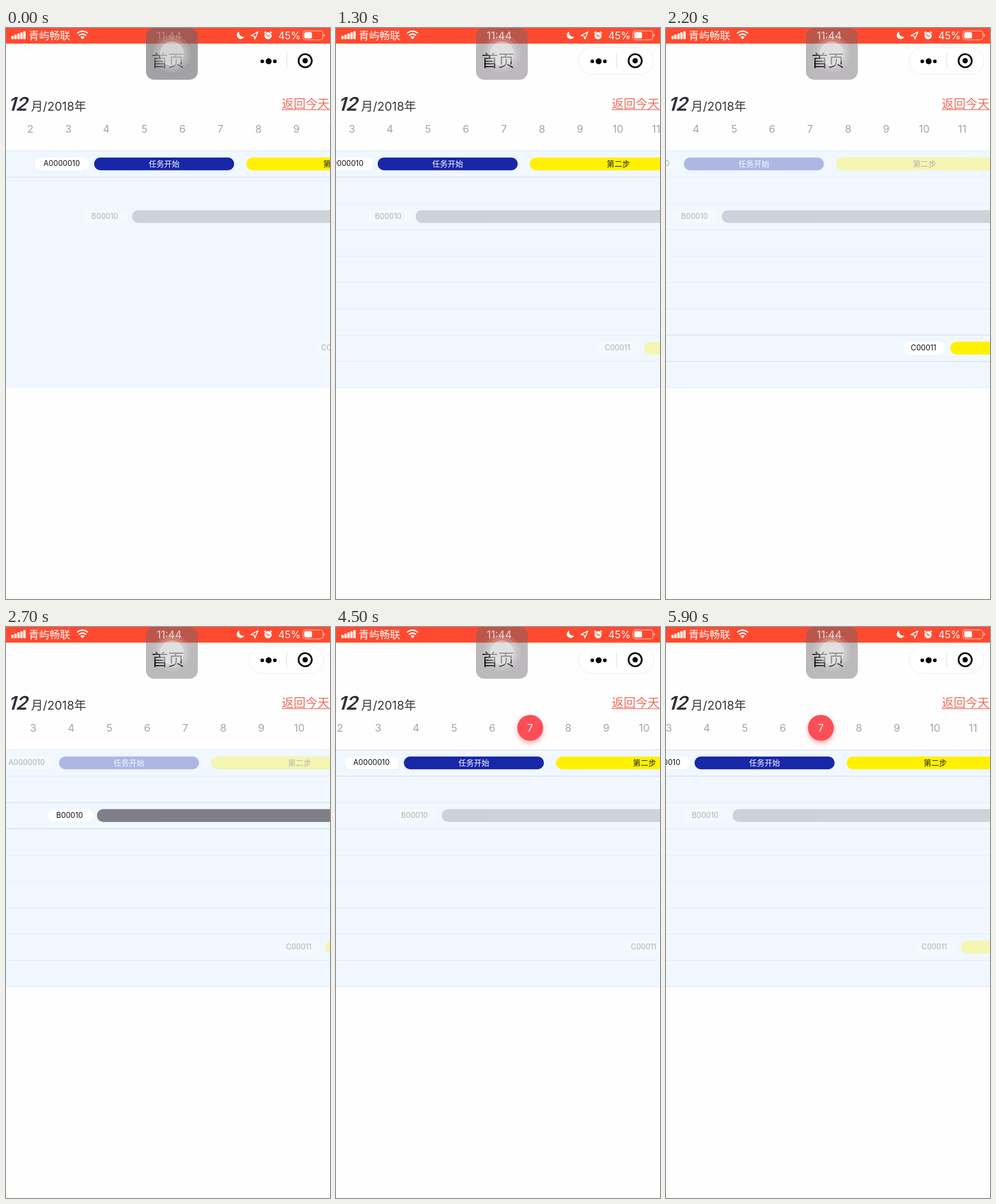
An HTML page that plays this animation: 544 by 960 pixels, repeating every 6000 ms.

```html
<!DOCTYPE html>
<html lang="zh-CN">
<head>
<meta charset="utf-8">
<style>
html, body { margin: 0; height: 100%; overflow: hidden; background: #fefefe; }
svg { display: block; width: 100vw; height: 100vh; font-family: Inter, "Noto Sans CJK SC", "Noto Sans CJK", sans-serif; }
.mid { text-anchor: middle; }
#rows .mid { font-size: 13px; }
</style>
</head>
<body>
<svg viewBox="0 0 544 960">
  <defs>
    <filter id="glow" x="-50%" y="-50%" width="200%" height="200%">
      <feDropShadow dx="0" dy="4" stdDeviation="4" flood-color="#fb5058" flood-opacity=".45"/>
    </filter>
  </defs>

  <!-- status bar -->
  <rect width="544" height="26.3" fill="#ff4a2f"/>
  <g fill="#fff">
    <g id="signal"></g>
    <text x="38" y="18.5" font-size="17.5">青屿畅联</text>
    <path d="M119.5 9A13 13 0 0 1 137.5 9M122.6 12.6A8.5 8.5 0 0 1 134.4 12.6" fill="none" stroke="#fff" stroke-width="2.4"/>
    <path d="M125 15.2a5 5 0 0 1 7 0l-3.5 3.8z"/>
    <path d="M391.5 6A6.5 6.5 0 1 0 400 14.5A7 7 0 0 1 391.5 6z"/>
    <path d="M411 12.8L423 6.5L417.8 18.5L416.6 13.4z" fill="none" stroke="#fff" stroke-width="1.5" stroke-linejoin="round"/>
    <circle cx="440" cy="13" r="6"/>
    <path d="M433.6 8.6l3-2.8M446.4 8.6l-3-2.8" stroke="#fff" stroke-width="1.8"/>
    <path d="M437 10.5l3 3h3" fill="none" stroke="#ff4a2f" stroke-width="1.3"/>
    <text x="457" y="18.5" font-size="17">45%</text>
    <rect x="498.6" y="4.8" width="33.4" height="15" rx="4" fill="none" stroke="#fff" stroke-opacity=".6" stroke-width="1.2"/>
    <rect x="500.8" y="7" width="13" height="10.6" rx="2"/>
    <path d="M533.5 9.5q2 .5 2 2.8t-2 2.8z" opacity=".6"/>
  </g>

  <!-- title bar -->
  <rect class="settle" x="408" y="32.5" width="125.5" height="45.5" rx="22.7" fill="#fff" stroke="#eee"/>
  <g fill="#050505">
    <circle cx="430.3" cy="56" r="3.1"/><circle cx="441" cy="56" r="5"/><circle cx="451.4" cy="56" r="3.1"/>
    <circle cx="502.3" cy="55" r="4.5"/>
    <circle cx="502.3" cy="55" r="11.1" fill="none" stroke="#050505" stroke-width="2.9"/>
  </g>
  <path d="M471.5 42v26" stroke="#ddd"/>
  <rect id="panel" x="235" width="87" height="87" rx="14" fill="#68656a"/>
  <text id="clock" class="mid" x="274" y="18.5" font-size="17.5" fill="#f0e6e6">11:44</text>
  <text id="title" x="244.5" y="65" font-size="27.5" fill="#0c0c0c">首页</text>
  <g fill="#fff">
    <circle cx="278.5" cy="43" r="31.5" opacity=".1"/>
    <circle cx="278.5" cy="43" r="26" opacity=".16"/>
    <circle cx="278.5" cy="43" r="20.5" opacity=".4"/>
  </g>

  <!-- calendar head -->
  <text transform="translate(2.5 139) skewX(-16)" font-size="31.5" font-weight="600" fill="#2f2f36">12</text>
  <text x="42" y="139" font-size="20" fill="#33333a">月/2018年</text>
  <text x="463" y="135" font-size="20" fill="#ee6c5e">返回今天</text>
  <path d="M463 137.3h81" stroke="#ee6c5e" stroke-width="1.2"/>

  <!-- schedule -->
  <rect y="206" width="544" height="399" fill="#f0f7fe"/>
  <g id="lines" class="settle" stroke="#e5ebf3"></g>
  <path id="frame" stroke="#d9dfe8" fill="none"/>
  <g id="scroll">
    <circle id="today" cx="212.05" cy="169.5" r="21.8" fill="#fb5058" filter="url(#glow)"/>
    <g id="days" class="mid" font-size="17.5"></g>
    <g id="rows" font-size="12.5"></g>
  </g>
</svg>
<script>
const $ = id => document.getElementById(id);
const ROW = 44.25, TOP = 206.5, DAY = 63.85, TODAY = 7;
const rowY = i => TOP + i * ROW;
const pill = (x, y, w, fill) => `<rect x="${x}" y="${y}" width="${w}" height="21.5" rx="10.75" fill="${fill}"/>`;
const label = (x, y, text, fill, cls = '') => `<text class="${cls}" x="${x}" y="${y}" fill="${fill}">${text}</text>`;

// Bars: [left, width, colour, text, text colour]; all x are relative to the first bar
const tasks = [
  { row: 0, name: 'A0000010', x: -99, w: 90.5, textX: -85, bars: [
    [0, 235, '#1827a8', '任务开始', '#fff'], [255.5, 297, '#fff100', '第二步', '#222']] },
  { row: 2, name: 'B00010', x: -18, w: 75, textX: -4.7, bars: [[63.7, 900, '#7f7f85']] },
  { row: 7, name: 'C00011', x: 369, w: 70, textX: 381, bars: [[447.3, 400, '#fff100']] }
];

for (let i = 0; i < 5; i++) {
  const h = 5.5 + i * 2;
  $('signal').innerHTML += `<rect x="${9 + i * 5}" y="${18.8 - h}" width="4" height="${h}" rx="1"/>`;
}
for (let i = 0; i < 10; i++) $('lines').innerHTML += `<path d="M0 ${rowY(i)}h544"/>`;
for (let d = 1; d < 15; d++) $('days').innerHTML += label(20.5 + (d - 4) * DAY, 176, d, '#a5a5aa');
$('rows').innerHTML = tasks.map(({ row, name, x, w, textX, bars }) => {
  const y = rowY(row) + 11.2;
  return '<g>' + pill(x, y, w, '#fff') + label(textX, y + 14.6, name, '#111') +
    bars.map(([bx, bw, fill, text, ink]) => pill(bx, y, bw, fill) +
      (text ? label(bx + bw / 2, y + 15, text, ink, 'mid') : '')).join('') + '</g>';
}).join('');

const rows = [...$('rows').children];
const todayText = $('days').children[TODAY - 1];
const settling = document.querySelectorAll('.settle');

const scrollKeys = [[0, 148], [800, 148], [900, 136.5], [1200, 84], [1500, 42], [1700, 30], [2600, 30],
  [2700, 89], [2800, 112], [2900, 125], [3000, 131.5], [4400, 131.5], [4500, 114], [4600, 84],
  [4700, 60], [4800, 48], [6000, 48]];

function scrollAt(t) {
  const i = scrollKeys.findIndex(k => k[0] > t);
  const [t0, x0] = scrollKeys[i - 1], [t1, x1] = scrollKeys[i];
  return x0 + (x1 - x0) * (t - t0) / (t1 - t0);
}

function draw(now) {
  const t = Math.floor(now % 6000 / 100) * 100;
  const active = t < 2200 || t >= 3300 ? 0 : t < 2700 ? 2 : 1;
  const marked = t >= 4500;
  const settled = Math.min(1, t / 300);

  $('scroll').setAttribute('transform', `translate(${scrollAt(t)})`);
  rows.forEach((g, i) => g.setAttribute('opacity', i === active ? 1 : .3));
  const y = rowY(tasks[active].row);
  $('frame').setAttribute('d', `M0 ${y}h544M0 ${y + ROW}h544`);

  $('today').setAttribute('visibility', marked ? 'visible' : 'hidden');
  todayText.setAttribute('fill', marked ? '#ffe9e9' : '#a5a5aa');

  settling.forEach(e => e.setAttribute('opacity', settled));
  $('title').setAttribute('opacity', .65 + .35 * settled);
  $('clock').setAttribute('opacity', .3 + .6 * settled);
  $('panel').setAttribute('opacity', .6 - .15 * settled);
  requestAnimationFrame(draw);
}
requestAnimationFrame(draw);
</script>
</body>
</html>
```
